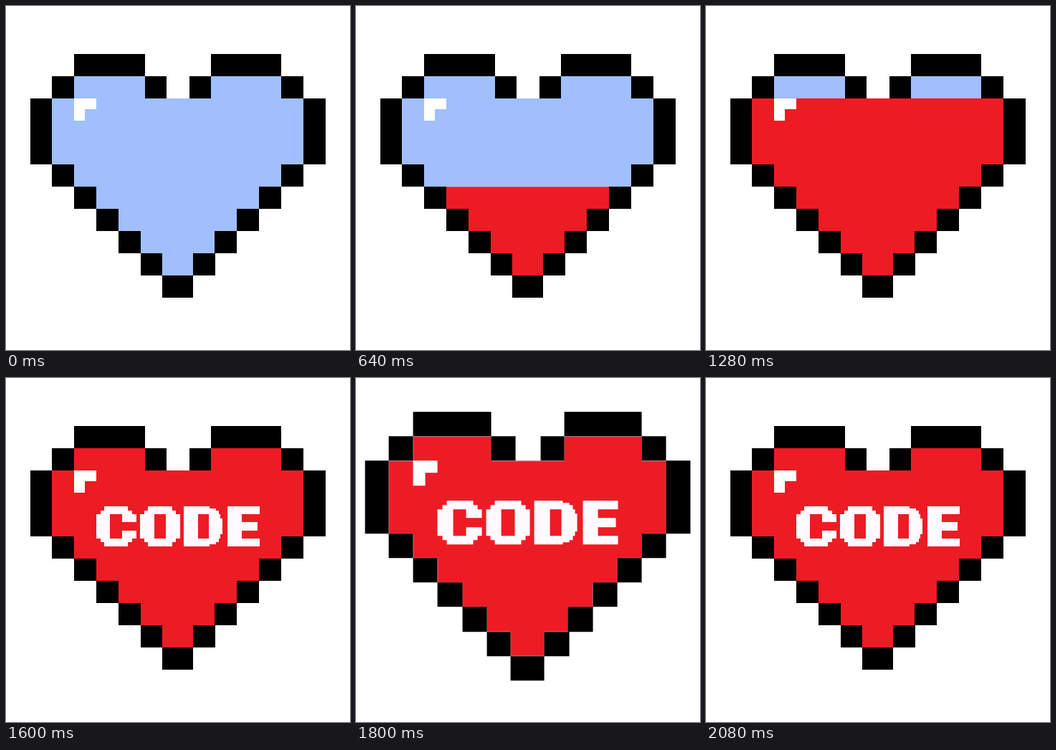
These frames come from a looping animation (480x480 px, 2.92 s). An HTML page:

```html
<!DOCTYPE html>
<html lang="en">
<head>
<meta charset="utf-8">
<title>Code heart</title>
<style>
  html, body { margin: 0; width: 100%; height: 100%; overflow: hidden; background: #fff; }
  svg { display: block; width: 100vw; height: 100vh; shape-rendering: crispEdges; }
  #heart { transform-origin: 242px 259px; animation: pulse 2920ms step-end infinite; }
  #level { animation: rise 2920ms linear infinite; }
  #word { animation: show 2920ms step-end infinite; }

  /* nine rows, one every 160 ms */
  @keyframes rise {
    0% { transform: translateY(0); animation-timing-function: steps(9, end); }
    49.314%, 100% { transform: translateY(-278px); }
  }
  @keyframes show {
    0% { visibility: hidden; }
    54.794%, 100% { visibility: visible; }
  }
  /* sine swell in 40 ms steps */
  @keyframes pulse {
    0%, 71.232%, 100% { transform: scale(1); }
    56.164%, 69.862% { transform: scale(1.007); }
    57.534%, 68.493% { transform: scale(1.028); }
    58.904%, 67.123% { transform: scale(1.055); }
    60.273%, 65.753% { transform: scale(1.083); }
    61.643%, 64.383% { transform: scale(1.103); }
    63.013% { transform: scale(1.11); }
  }
</style>
</head>
<body>
<svg viewBox="0 0 480 480" role="img" aria-label="CODE">
  <defs>
    <path id="inside" d="M95 98H194V129H286V98H384V129H415V221H384V252H353V283H322V314H291V345H261V376H218V345H188V314H157V283H126V252H95V221H64V129H95Z"/>
    <clipPath id="clip"><use href="#inside"/></clipPath>
  </defs>
  <g id="heart">
    <use href="#inside" fill="#a0bffc"/>
    <g clip-path="url(#clip)">
      <rect id="level" x="60" y="376" width="360" height="300" fill="#ed1c24"/>
    </g>
    <!-- outline -->
    <path d="M95 67H194V98H95Z M286 67H384V98H286Z
      M64 98H95V129H64Z M194 98H224V129H194Z M256 98H286V129H256Z M384 98H415V129H384Z
      M34 129H64V221H34Z M415 129H446V221H415Z
      M64 221H95V252H64Z M384 221H415V252H384Z
      M95 252H126V283H95Z M353 252H384V283H353Z
      M126 283H157V314H126Z M322 283H353V314H322Z
      M157 314H188V345H157Z M291 314H322V345H291Z
      M188 345H218V376H188Z M261 345H292V376H261Z
      M218 376H261V407H218Z"/>
    <path d="M95 129H126V144H110V160H95Z" fill="#fff"/>
    <!-- block letters on a 41 by 10 grid -->
    <g id="word" fill="#fffaff">
      <path transform="translate(126 179) scale(5.56 5.6)" fill-rule="evenodd" d="
        M2 0h6v1h1v1h1v2h-3.5v-2h-3v6h3v-2h3.5v2h-1v1h-1v1h-6v-1h-1v-1h-1v-6h1v-1h1z
        M13 0h6v1h1v1h1v6h-1v1h-1v1h-6v-1h-1v-1h-1v-6h1v-1h1z M14.5 2v6h3v-6z
        M22 0h6.5v.5h1.5v.5h.7v1h.5v1h.5v4h-.5v1h-.5v1h-.7v.5h-1.5v.5h-6.5z M25.5 2v6h2.7v-6z
        M33 0h8v2h-4.5v2h4v2h-4v2h4.5v2h-8z"/>
    </g>
  </g>
</svg>
</body>
</html>
```
